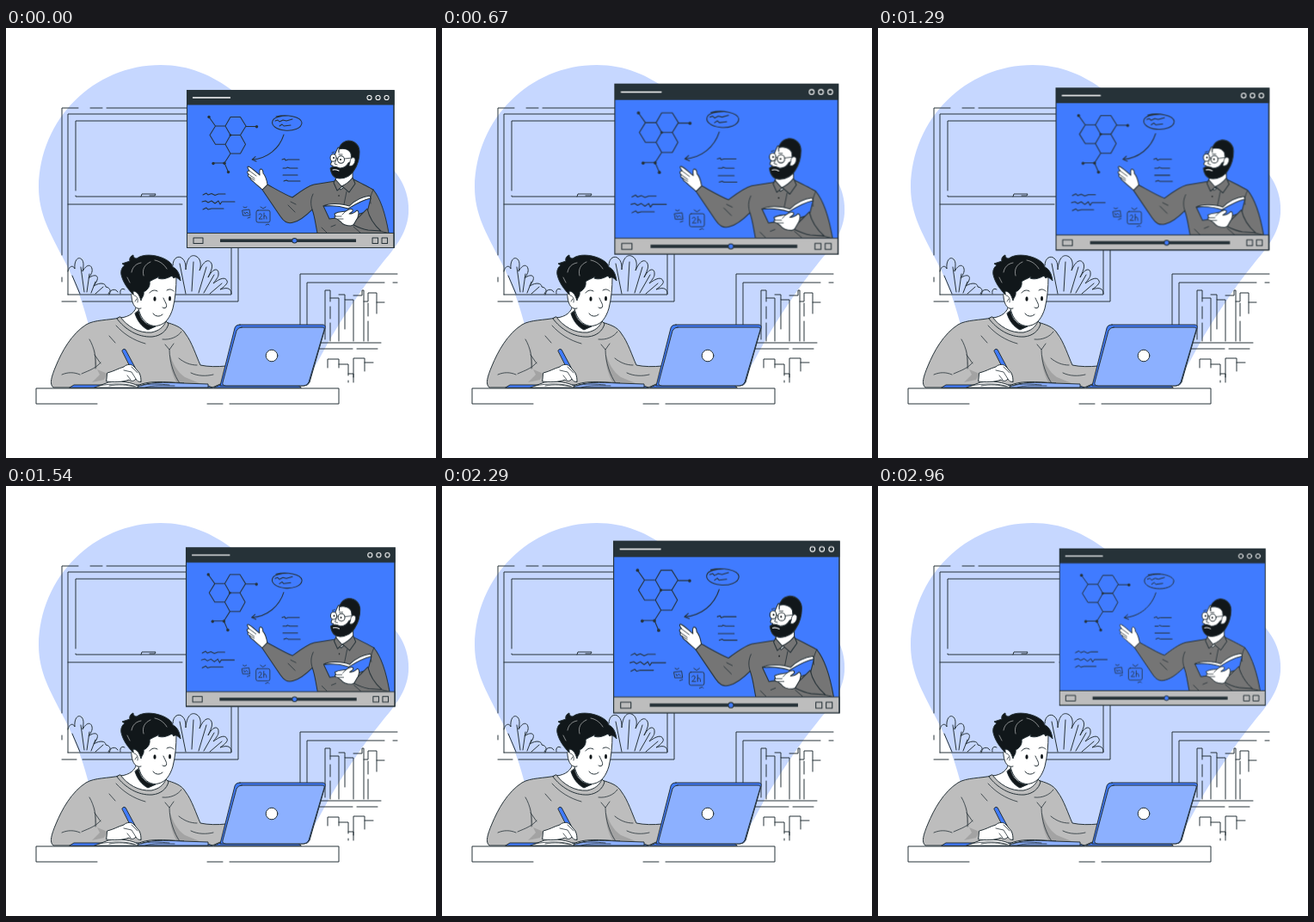
Animation of 500x500 px, one loop 3000 ms. Source, as an HTML page:

```html
<!DOCTYPE html>
<html lang="en">
<head>
<meta charset="utf-8">
<title>Online lesson</title>
<style>
html, body { margin: 0; width: 100%; height: 100%; overflow: hidden; background: #fff; }
svg { display: block; width: 100vw; height: 100vh; }
path, rect, circle, ellipse { stroke: #263238; stroke-width: 1; stroke-linecap: round; stroke-linejoin: round; fill: none; }
.white { fill: #fff; }
.ink { fill: #11171a; }
.dark { fill: #263238; }
.blue { fill: #407bff; }
.sky { fill: #8cb0ff; }
.gray { fill: #bdbdbd; }
.coat { fill: #757575; }
.shade { fill: #a3a3a3; stroke: none; }
.plain { stroke: none; }
.light { stroke: #fff; }
.thin { stroke-width: .8; }
#screen { transform-origin: 330.7px 164.1px; animation: pulse 3s linear infinite; }
@keyframes pulse {
  0%, 100% { transform: scale(1); }
  16.9%, 76.8% { transform: scale(1.0934); }
  57.4%, 98.67% { transform: scale(.9938); }
}
</style>
</head>
<body>
<svg viewBox="0 0 500 500">
  <!-- backdrop -->
  <path class="plain" style="fill:#c6d7ff" d="M38 185C39 106 102 43 180 43C213 43 240 55 265 74C320 112 390 124 430 148C457 164 470 190 468 216C466 240 451 257 437 274C415 301 396 330 379 358C366 380 357 402 340 419H120C106 400 103 370 96 345C88 314 78 289 65 265C52 239 38 217 38 185Z"/>

  <!-- window -->
  <path d="M65 264V93H84M98 93H112M117 93H270V318H89M82 318H65M65 290V295M72 310V100H262V310H72M81 189V108H262M81 195V196H216M72 205H205M211 205H262"/>
  <path d="M157 196L158 193H174L173 195H167"/>
  <g id="bushes" class="thin">
    <path d="M72 283C73 277 78 275 80 280C79 270 84 265 88 269C91 272 90 278 89 283C94 274 99 275 100 280C101 284 98 288 96 291C102 286 108 287 106 293C105 296 103 298 102 300C110 295 116 297 116 301C122 302 122 307 120 310M77 288L86 309M87 278L91 307M97 286L94 307M104 295L99 308M113 301L104 309"/>
    <path d="M194 276C194 267 201 264 205 268C209 271 209 277 209 281C210 267 216 262 222 266C227 269 227 277 225 282C230 270 236 268 239 274C241 279 237 285 235 290C241 278 248 279 247 287C247 290 243 294 241 297C249 291 255 289 257 294C259 297 252 302 249 304C258 301 262 303 262 309M202 274L209 309M218 272L216 306M233 278L224 308M242 287L230 308M251 297L237 309"/>
    <path d="M119 309C122 303 128 303 130 307M133 309C132 304 135 302 138 304"/>
  </g>

  <!-- bookcase -->
  <path d="M455 286H342V346M440 296H350V346M450 296H455M366 366H436M364 373H403M408 373H432"/>
  <path d="M371 362V305H377V318M377 324V338M377 343V364M377 314H387V364M387 310H394V316H404V364M394 316V350M404 311H414V305H416V364M416 318H421V308H431V332M421 320V335M421 341V364M431 319H440"/>
  <path d="M374 395V385H387V395M387 391H398V404M398 410V412M398 402H404V412M404 406V384H417V399M417 389H427"/>

  <!-- desk -->
  <path class="white plain" d="M35 419H387V437H35Z"/>
  <path d="M106 437H35V419H387V437H260M252 437H234"/>

  <!-- student -->
  <path class="gray" d="M132 337C119 340 103 339 93 345C76 356 65 376 58 393C53 405 50 414 55 418H240L256 411V393C246 394 235 394 226 392C221 381 216 365 209 356C204 347 195 345 186 342Z"/>
  <path class="shade" d="M103 371L106 397L118 402L114 409L100 412L109 403L103 391Z"/>
  <path class="shade" d="M190 377C193 389 199 400 208 406L225 413H199C193 404 190 391 190 377Z"/>
  <path class="thin" d="M97 362C103 372 105 384 104 396M103 380L110 390M88 402C97 398 104 396 110 389M65 403C72 400 79 400 86 403M190 374C190 389 196 405 202 413M182 362C191 363 200 359 204 353M185 368L190 374L195 367M222 392C214 392 207 389 201 384M128 346C137 356 148 363 162 367M120 358L127 366M215 401C223 405 233 405 241 403"/>
  <path class="white" d="M152 322C151 330 144 336 133 337C141 348 154 358 170 357C180 355 186 349 186 341L176 333Z"/>
  <path class="ink" d="M154 329C156 341 165 347 174 347L165 351C157 347 152 339 150 332Z"/>
  <path class="gray" d="M133 336C141 347 154 355 169 354C178 352 183 348 186 341L189 344C187 352 180 358 170 359C153 360 138 350 129 338Z"/>
  <path class="white" d="M153 288C151 307 151 322 157 335C162 344 170 348 177 346C186 344 191 336 194 326C197 314 198 302 198 289Z"/>
  <path class="white" d="M155 310C150 302 145 306 146 313C147 322 151 328 157 326"/>
  <path class="thin" d="M149 311C152 311 154 315 153 319M152 315L150 318"/>
  <path class="ink" d="M148 310C142 304 136 296 134 287C133 282 135 278 138 276L135 274L144 271C143 268 145 265 148 264C148 266 149 268 152 268C160 262 173 264 181 267C189 270 193 274 194 278C199 280 202 286 203 294C199 290 197 289 195 291L193 288C188 291 182 293 177 291L178 289C173 292 169 293 167 295C168 301 164 305 160 307C161 311 158 313 157 317C155 311 153 306 148 306Z"/>
  <path class="light" style="stroke-width:.5" d="M146 284C147 278 151 274 157 273M160 288C158 281 161 275 168 272M173 270C179 271 184 275 187 280M141 290L144 296"/>
  <ellipse class="ink plain" cx="173" cy="315" rx="1.6" ry="2.8"/>
  <ellipse class="ink plain" cx="190.500" cy="314.500" rx="1.5" ry="2.800"/>
  <path d="M167 308C169 305 173 304 176 306M187 305C190 303 193 304 195 306M183 314C185 319 188 322 186 325C185 326 183 326 182 325M171 332C174 336 179 336 182 333"/>

  <!-- notebook, hand and pen -->
  <path class="blue" d="M74 418L79 415H232L240 418Z"/>
  <path class="white" d="M103 418L119 412C133 410 147 412 153 416C164 410 183 411 207 413L190 418Z"/>
  <path class="sky" d="M153 417C166 411 184 412 205 413L235 414V418H155Z"/>
  <path class="thin" d="M108 416C124 413 140 413 151 417M120 416C131 414 141 415 149 417M157 416C167 413 178 414 190 415M162 418C171 415 184 416 196 416"/>
  <path class="blue" d="M135 375C136 373 138 373 139 374L155 404L157 412L151 407Z"/>
  <path class="white" d="M118 401C126 399 130 396 137 394C140 391 146 390 149 394L155 401C157 405 157 409 157 411C154 412 152 410 151 408C148 412 144 410 143 409C136 412 124 412 117 411Z"/>
  <path class="thin" d="M137 398L146 400L151 408M141 404L145 409M146 394L153 401"/>

  <!-- laptop -->
  <path class="blue" d="M242 418L249 415H339L343 418Z"/>
  <path class="blue" d="M272 345H368Q372 345 371 349L353 412Q351 416 347 416H249L266 349Q267 345 272 345Z"/>
  <path class="sky" d="M274 348H367Q371 348 370 351L352 412Q350 416 346 416H256Q251 416 252 412L268 352Q270 348 274 348Z"/>
  <circle class="white" cx="309" cy="381" r="6.800"/>

  <!-- video window -->
  <g id="screen">
    <rect class="blue" x="210.500" y="72.500" width="240.500" height="183"/>
    <rect class="dark" x="210.500" y="72.500" width="240.500" height="16.500"/>
    <path class="light" style="stroke-width:1.300" d="M217.500 81H260.500"/>
    <g style="stroke-width:1.200">
      <circle class="light" cx="422.500" cy="81" r="2.600"/>
      <circle class="light" cx="432.500" cy="81" r="2.600"/>
      <circle class="light" cx="442.500" cy="81" r="2.600"/>
    </g>

    <!-- board notes -->
    <path d="M243.500 114H255L261 103.500H272.500L279 114L272.500 124.600H261L255 114M255 135.200L261 124.600H272.500L278.500 135.200L272.500 146H261L255 135.200H243.500L237 124.600L243.500 114L236 103.500M279 114.500H291M261 146L254 157H241M254 157L258.500 167.500"/>
    <g class="dots">
      <circle class="dark plain" cx="236" cy="103.500" r="1.700"/>
      <circle class="dark plain" cx="291.500" cy="114.700" r="1.700"/>
      <circle class="dark plain" cx="241" cy="157.500" r="1.700"/>
      <circle class="dark plain" cx="254" cy="157.300" r="1.700"/>
      <circle class="dark plain" cx="258.500" cy="167.500" r="1.700"/>
      <circle class="dark plain" cx="261" cy="124.600" r="1.400"/>
    </g>
    <path d="M314 103C326 100 343 103 344 110C344 117 333 120 324 119C314 118 308 113 310 108C311 104 320 102 328 102M313 108L316 107L318 109L322 107L326 108L333 106M318 114L321 112L323 114L331 113"/>
    <path d="M323 124C318 140 304 152 286 153M290 149.500L286 153L291 155"/>
    <path d="M321 153L324 152L325 154L328 153H341M322 163H326L327 162L330 163H339M322 171H339M323 178L326 177L328 178H342"/>
    <path d="M229 194L233 192L235 194L239 192.500L243 194.500L247 193H255M228 202L232 201L235 203L239 201L243 204L247 201L249 205L251 202H266M229 211L233 209L235 211L239 210H253"/>
    <path class="thin" d="M275 212L283 211L284 218H276ZM277 214L278 216L280 214L282 216M276 208L278 209L280 208M281 221L284 220M293 212H305Q307 212 307 214V224Q307 226 305 226H293Q291 226 291 224V214Q291 212 293 212ZM294 217C296 214 299 217 296 220L294 222H298M300 215V222M300 219C302 217 303 219 303 222M296 208L299 210L302 208M302 229L305 228L306 229"/>

    <!-- teacher -->
    <path class="coat" d="M304 182C315 188 325 194 333 197C341 191 350 184 358 182L383 178L404 176C412 180 422 185 427 188C436 199 442 221 445 238.500H362C360 229 359 219 356 211C350 217 342 224 334 226C327 228 323 225 319 219L298 188Z"/>
    <path class="thin" d="M356 211C354 205 354 199 357 193M328 206L336 214M331 202L337 205M427 188C424 194 423 199 424 204M396 190L393 205M367 232L373 238M420 228C427 233 433 236 443 238M404 231L412 238M378 231L383 229"/>
    <path class="white" d="M298 188L304 182C303 176 301 171 299 169C299 166 298 164 296 164C294 165 295 169 295 171C290 167 285 162 282 161C280 161 281 163 283 166C280 166 280 168 282 170C281 171 281 173 284 174C283 176 286 177 288 179C292 183 295 185 298 188Z"/>
    <path class="thin" d="M283 166L291 172M282 170L289 175M284 174L289 177"/>
    <path class="white" d="M384 165L383 181L389 188L403 177V160Z"/>
    <path class="coat" d="M383 176L381 180L385 189L391 184L399 191L406 181L403 174C399 179 395 182 390 184Z"/>
    <path class="white" d="M386 139C383 145 381 151 378 157C377 159 378 160 380 160L381 171H397L406 159L405 142Z"/>
    <path class="ink" d="M387 145C386 139 390 132 398 131C406 131 411 137 411 144C411 151 409 159 405 165C402 171 395 175 388 175C382 175 378 171 377 163C380 160 384 161 388 163C392 163 396 161 398 157L402 155L401 146C399 141 392 139 387 141Z"/>
    <path class="white thin" d="M400 156C400 150 405 149 406 153C406 158 402 162 399 160Z"/>
    <path class="light" d="M380 165C383 164 385 165 387 166"/>
    <g class="thin">
      <ellipse class="white" cx="380.500" cy="151" rx="3.500" ry="4.300"/>
      <ellipse class="white" cx="389.500" cy="153" rx="4" ry="4.300"/>
    </g>
    <circle class="ink plain" cx="381" cy="151" r="1"/>
    <circle class="ink plain" cx="389" cy="153" r="1"/>
    <path class="thin" d="M393.500 152L402 151M384 151L386 152M384 153L382 158L385 159M379 145L382 144M387 147L391 147"/>
    <path class="blue" d="M369 207C379 206 390 206 398 209C406 203 415 199 424 198L420 214C411 215 403 219 396 223C389 221 381 221 376 222Z"/>
    <path class="white" d="M369 207C375 203 391 204 399 207C407 199 415 196 423 195L424 198C414 200 406 205 398 210C389 207 379 206 369 207Z"/>
    <path class="thin" d="M398 210L396 222"/>
    <path class="white" d="M382 216C387 213 392 214 395 213C400 209 404 210 403 213L399 216C403 216 406 214 408 212C411 213 410 217 409 220C408 225 406 229 401 230C395 230 391 228 389 225L385 222C382 222 381 219 383 219Z"/>
    <path class="thin" d="M383 219L390 219M386 222L392 222M395 213L391 217"/>
    <path class="coat" d="M408 222L420 210C422 219 428 229 436 236L421 235C414 234 408 231 404 229Z"/>
    <circle class="ink plain" cx="387" cy="195" r=".8"/>

    <!-- player controls -->
    <rect class="gray" x="210.500" y="238.500" width="240.500" height="17"/>
    <rect x="218" y="244" width="11" height="6.500"/>
    <rect class="dark plain" x="249" y="245.400" width="158" height="3.600"/>
    <circle class="blue" cx="335.500" cy="247.200" r="2.800"/>
    <rect x="426" y="244" width="6.500" height="6.500"/>
    <rect x="437" y="244" width="6.500" height="6.500"/>
    <rect x="210.500" y="72.500" width="240.500" height="183"/>
  </g>
</svg>
</body>
</html>
```
